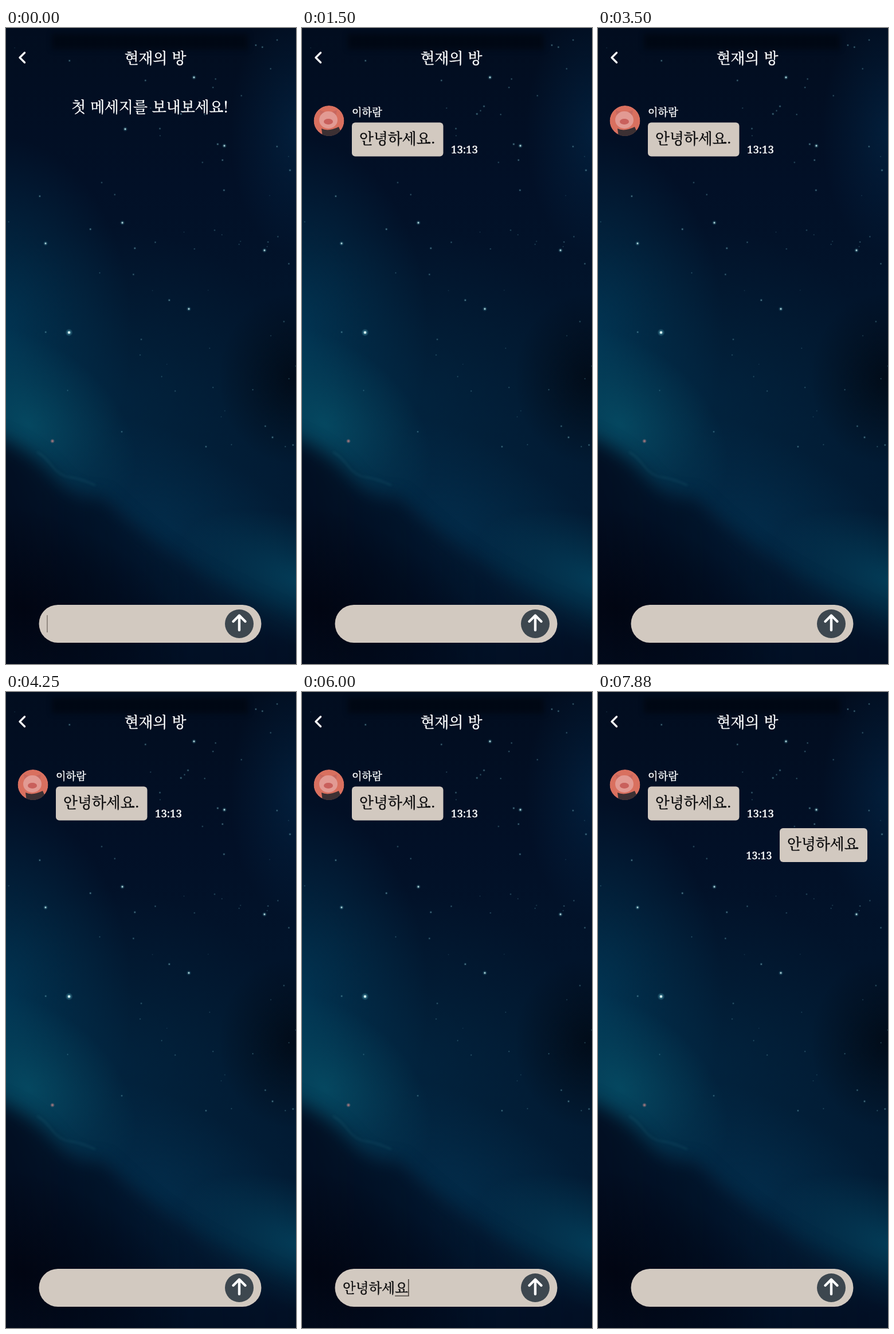
Animation of 506 by 1107 pixels, one loop 8000 ms. Source, as an HTML page with a canvas:

```html
<!DOCTYPE html>
<html lang="ko">
<head>
<meta charset="utf-8">
<title>현재의 방</title>
<style>
  html, body { margin: 0; width: 100%; height: 100%; overflow: hidden; background: #020b1b; }
  canvas, svg { position: absolute; left: 0; top: 0; width: 100%; height: 100%; }
  text { font: 25.8px "Noto Serif CJK KR", "Noto Sans CJK KR", serif; fill: #fff; stroke: #fff; stroke-width: 0.45; }
  .dark { fill: #0b0b0c; stroke: #0b0b0c; }
  .time { font: 18.6px "Noto Serif", serif; }
  .name { font-size: 18.2px; }
  #typed { font-size: 23.6px; }
  .panel { fill: #d2c9c0; }
  .line { fill: none; stroke: #fff; stroke-linecap: round; stroke-linejoin: round; }
</style>
</head>
<body>
<canvas id="sky" width="506" height="1107"></canvas>
<svg viewBox="0 0 506 1107" preserveAspectRatio="none">
  <path class="line" stroke-width="3.4" d="M32.500 43L24 51.500L32.500 60"/>
  <text x="260.5" y="61.5" text-anchor="middle">현재의 방</text>
  <text id="hint" x="251" y="147" text-anchor="middle">첫 메세지를 보내보세요!</text>

  <g id="received">
    <clipPath id="round"><circle cx="47" cy="161.5" r="26.5"/></clipPath>
    <g clip-path="url(#round)">
      <circle cx="47" cy="161.5" r="26.5" fill="#d9705f"/>
      <path d="M31 143L43 147L33 156ZM61 143L49 147L59 156Z" fill="#c8685f"/>
      <ellipse cx="46" cy="160" rx="16" ry="15" fill="#e29a93"/>
      <ellipse cx="46" cy="163" rx="8" ry="5" fill="#c9605c"/>
      <path d="M34 175Q46 181 64 172L72 190H36Z" fill="#3c3033"/>
    </g>
    <text class="name" x="87" y="153">이하람</text>
    <rect class="panel" x="87" y="164.5" width="159.5" height="59" rx="6"/>
    <text class="dark" x="100" y="202">안녕하세요.</text>
    <text class="time" x="260" y="217.5">13:13</text>
  </g>

  <g id="sent">
    <text class="time" x="258.5" y="290.5" style="font-size:17.8px">13:13</text>
    <rect class="panel" x="317" y="237" width="153" height="59" rx="6"/>
    <text class="dark" x="330" y="274">안녕하세요</text>
  </g>

  <rect class="panel" x="57.5" y="1004" width="388" height="66" rx="33"/>
  <circle cx="407" cy="1037" r="25" fill="#3d474f"/>
  <path class="line" stroke-width="4.4" d="M407 1048V1023M396.500 1033L407 1022.500L417.500 1033"/>
  <text id="typed" class="dark" x="71" y="1045.5"></text>
  <rect id="underline" y="1050.5" height="1.3" fill="#38332f"/>
  <rect id="caret" y="1022" width="1.8" height="30" fill="#544c45"/>
</svg>
<script>
const $ = id => document.getElementById(id);
const ctx = $('sky').getContext('2d');

function glow(x, y, rx, ry, degrees, color, alpha) {
  const g = ctx.createRadialGradient(0, 0, 0, 0, 0, 1);
  g.addColorStop(0, color);
  g.addColorStop(0.5, color + '78');
  g.addColorStop(1, color + '00');
  ctx.save();
  ctx.translate(x, y);
  ctx.rotate(degrees * Math.PI / 180);
  ctx.scale(rx, ry);
  ctx.globalAlpha = alpha;
  ctx.fillStyle = g;
  ctx.fillRect(-1, -1, 2, 2);
  ctx.restore();
}

function ramp(x, y, colors) {
  const g = ctx.createLinearGradient(0, 0, x, y);
  colors.forEach((c, i) => g.addColorStop(i / (colors.length - 1), c));
  return g;
}

function drawSky() {
  ctx.fillStyle = ramp(0, 1107, ['#020d1f', '#021027', '#02162d', '#021c35', '#020e22']);
  ctx.fillRect(0, 0, 506, 1107);
  glow(200, 650, 330, 300, 20, '#02304e', 0.45);
  glow(-10, 530, 230, 340, 0, '#014465', 0.65);
  glow(40, 690, 210, 140, 38, '#07586f', 0.65);
  glow(290, 870, 330, 150, 30, '#03385a', 0.5);
  glow(510, 180, 120, 220, 0, '#033258', 0.45);
  glow(500, 610, 130, 150, 0, '#01060e', 0.65);
  glow(515, 965, 220, 110, 20, '#044f6c', 0.65);

  // dark land: crisp edge at left, fading out to the right
  ctx.filter = 'blur(15px)';
  ctx.fillStyle = ramp(506, 0, ['#020d20f0', '#020e22c0', '#02122880', '#02122860']);
  ctx.fill(new Path2D('M-50 700Q40 730 80 778T165 815Q260 905 350 955T570 1060V1160H-50Z'));
  ctx.filter = 'none';
  glow(30, 1010, 300, 170, 20, '#010410', 0.85);
  ctx.filter = 'blur(2px)';
  ctx.strokeStyle = '#3c879840';
  ctx.lineWidth = 2;
  ctx.stroke(new Path2D('M54 738Q66 744 80 762T112 782T156 796'));
  ctx.filter = 'blur(5px)';
  ctx.fillStyle = '#01050c90';
  ctx.fillRect(80, 10, 342, 27);
  ctx.filter = 'none';
}

function star(x, y, size) {
  glow(x, y, size * 2.2, size * 2.2, 0, '#4f9cae', Math.min(1, size * 0.38));
  ctx.globalAlpha = Math.min(1, size * size * 0.22);
  ctx.fillStyle = '#d3eeee';
  ctx.beginPath();
  ctx.arc(x, y, size * 0.75, 0, 7);
  ctx.fill();
  ctx.globalAlpha = 1;
}

function drawStars() {
  star(110, 530, 3);
  const bright = [[328, 86], [208, 176], [381, 205], [203, 339], [69, 375], [319, 489], [451, 387]];
  for (const [x, y] of bright) star(x, y, 1.9);
  glow(81, 719, 4, 4, 0, '#d98b8b', 0.9);

  // faint stars gather toward the upper right
  let seed = 11;
  const random = () => (seed = seed * 16807 % 2147483647) / 2147483647;
  for (let i = 0; i < 70; i++) {
    star(506 * Math.sqrt(random()), 20 + 710 * random(), 0.6 + 0.7 * random());
  }
}

const typing = ['ㅇ', '아', '안', '안녀', '안녕', '안녕ㅎ', '안녕하', '안녕핫', '안녕하세', '안녕하셍', '안녕하세요'];
const keyTime = 125, typeStart = 4750, blinkStart = 6500, sendTime = 7500, replyTime = 7630;

function typedAt(t) {
  if (t < typeStart || t >= sendTime) return '';
  const key = Math.floor((t - typeStart) / keyTime);
  return typing[Math.min(key, typing.length - 1)];
}

function caretAlpha(t) {
  if (t >= sendTime) return 0;
  if (t >= typeStart && t < blinkStart) return 1;
  const phase = (t < typeStart ? t : t - 5910) % 970;
  return phase < 370 ? 0.55 + 0.45 * Math.sin(Math.PI * phase / 370) : 0;
}

const show = (id, on) => $(id).setAttribute('visibility', on ? 'visible' : 'hidden');

function place(id, x, width) {
  $(id).setAttribute('x', x);
  $(id).setAttribute('width', width);
}

function frame(now) {
  const t = now % 8000;
  const text = typedAt(t);
  const field = $('typed');
  field.textContent = text;
  const n = text.length;
  const width = n ? field.getComputedTextLength() : 0;
  const last = n ? field.getSubStringLength(n - 1, 1) : 0;

  show('hint', t < 130);
  show('received', t >= 130);
  show('sent', t >= replyTime);
  place('underline', 71 + width - last, last);
  place('caret', 71 + width, 1.8);
  $('caret').setAttribute('opacity', caretAlpha(t));
  requestAnimationFrame(frame);
}

drawSky();
drawStars();
requestAnimationFrame(frame);
</script>
</body>
</html>
```
